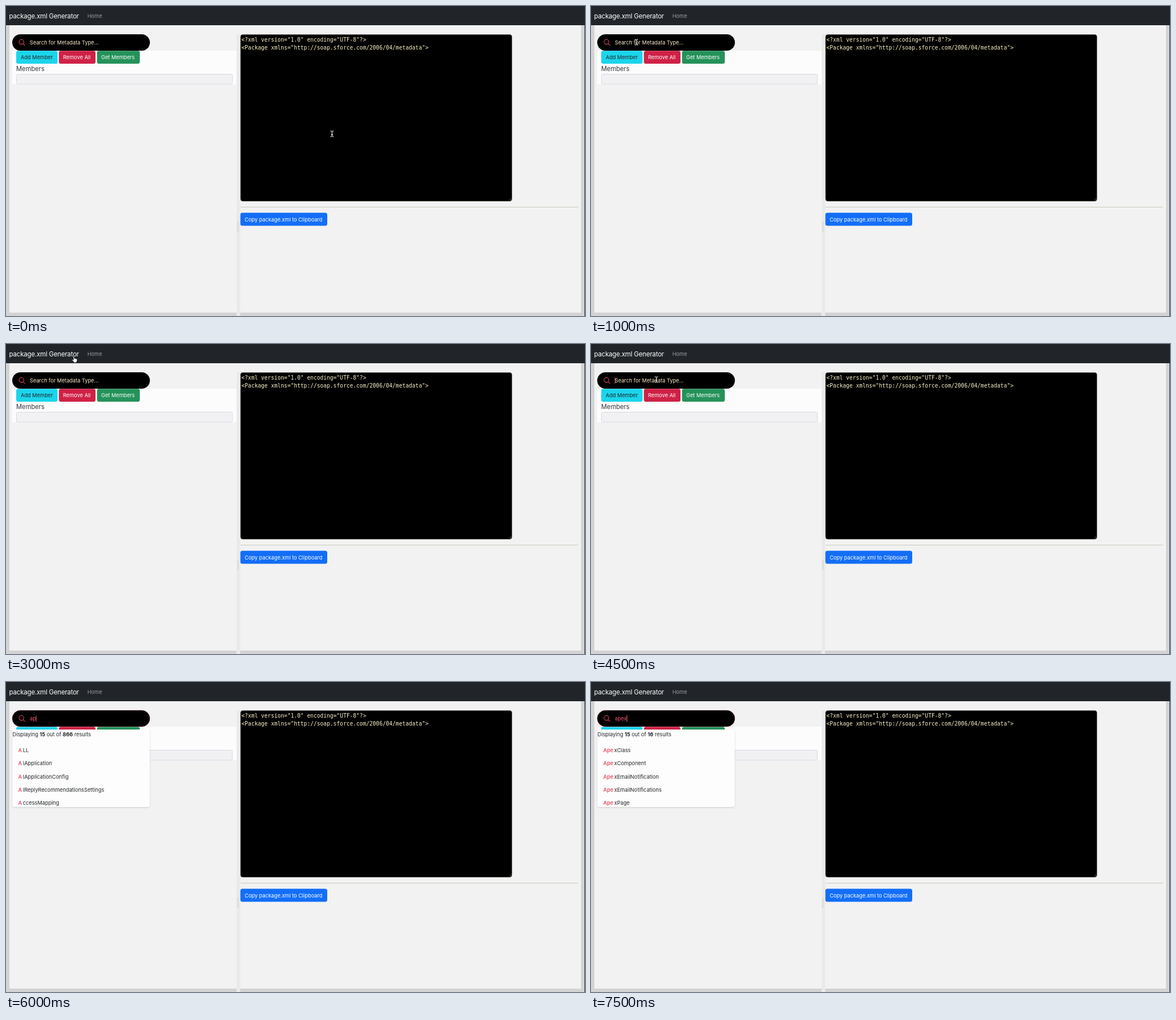
Recreate the animation shown at these times as an HTML page. Size 1022x548 px, loop 8000 ms.

```html
<!DOCTYPE html>
<html lang="en">
<head>
<meta charset="utf-8">
<title>package.xml Generator</title>
<style>
  html, body { margin: 0; width: 100%; height: 100%; overflow: hidden; background: #d3d3d4; }
  svg { display: block; width: 1022px; height: 548px; }
  text { font: 400 9.25px Inter, "Open Sans", sans-serif; white-space: pre; }
  .title { font-size: 11.5px; letter-spacing: -.17px; }
  .heading { font-size: 11.2px; }
  .code { font: 9.65px "DejaVu Sans Mono", "Liberation Mono", monospace; fill: #fbf3c8; }
  .b { font-weight: 700; }
  .hit { font-weight: 600; fill: #ec5069; }
  .white { fill: #fff; }
  .dark { fill: #212529; }
</style>
</head>
<body>
<svg viewBox="0 0 1022 548" xmlns="http://www.w3.org/2000/svg">
  <defs>
    <filter id="shadow" x="-5%" y="-5%" width="110%" height="112%">
      <feDropShadow dx="0" dy="1" stdDeviation="1.5" flood-color="#000" flood-opacity=".16"/>
    </filter>
    <pattern id="grip" x="408" y="382" width="2" height="2" patternUnits="userSpaceOnUse">
      <rect width="1" height="1" fill="#c4c4c8"/>
    </pattern>
  </defs>

  <rect width="1022" height="548" fill="#d3d3d4"/>
  <rect x="6" y="34" width="1009" height="508" fill="#f2f2f2"/>
  <rect x="1021" width="1" height="548" fill="#33363a"/>
  <rect width="1022" height="34" fill="#212529"/>
  <text class="title white" x="5.5" y="21.5">package.xml Generator</text>
  <text id="home" x="143.7" y="20.5">Home</text>

  <rect x="407" y="50" width="6.5" height="498" fill="#eaeaeb"/>
  <rect x="408" y="382" width="4" height="18" fill="url(#grip)"/>

  <rect x="11" y="79" width="396" height="59.5" fill="#fcfcfd"/>
  <g id="buttons"></g>
  <text class="heading" x="18" y="114.7" fill="#33373b">Members</text>
  <rect x="18.5" y="120.5" width="381" height="17.5" rx="2" fill="#f1f1f3" stroke="#d9d7e5"/>

  <rect x="414" y="50.5" width="479" height="294.5" rx="4" fill="#000" stroke="#5c5a48" stroke-width=".6"/>
  <path d="M888 343.5l4-4M890.5 343.5l1.5-1.5" stroke="#8a8a80" stroke-width=".6"/>
  <text class="code" x="415.5" y="62.6">&lt;?xml version="1.0" encoding="UTF-8"?&gt;</text>
  <text class="code" x="415.5" y="77.2">&lt;Package xmlns="http://soap.sforce.com/2006/04/metadata"&gt;</text>
  <path d="M414 355.5H1010" stroke="#c9c9be"/>

  <g id="drop" filter="url(#shadow)">
    <path d="M11.5 84H253.5V217a4 4 0 0 1-4 4H15.5a4 4 0 0 1-4-4Z" fill="#fdfdfd"/>
  </g>
  <g id="list"></g>

  <rect id="pill" x="11" y="50" width="243" height="29" rx="14.5" fill="#000"/>
  <g fill="none" stroke="#e5495d" stroke-width="1.1" stroke-linecap="round">
    <circle cx="27.2" cy="63.6" r="4.3"/>
    <path d="M30.4 66.8L33.2 69.6"/>
  </g>
  <text id="query" x="42" y="68"></text>
  <path id="caret" stroke="#f2788a" stroke-width=".9"/>

  <g id="beam" fill="none" stroke-linecap="round">
    <path id="beamLine" d="M-2.4 -5Q-.3 -5 0 -3.8Q.3 -5 2.4 -5M0 -3.8V3.8M-2.4 5Q-.3 5 0 3.8Q.3 5 2.4 5M-1.2 1.5H1.2" stroke="#222" stroke-width="2.2"/>
    <use href="#beamLine"/>
  </g>
  <path id="hand" fill="#fff" stroke="#111" stroke-width=".8" stroke-linejoin="round"
    d="M-2.4 -4.6Q-1.5 -6 -.6 -4.6L0 -1.3Q1 -2 1.7 -1Q2.7 -1.7 3.3 -.5Q4.6 -.8 4.7 .8Q4.8 3 3.6 4.6V6H-1.6V4.7L-4.6 1.2Q-4.6 -.3 -3 .5L-1.8 1.6Z"/>
  <path id="arrow" fill="#111" stroke="#fff" stroke-width=".8" d="M0 0V9.2L2.1 7.3L3.6 10.6L5.2 9.9L3.8 6.7H6.7Z"/>
</svg>
<script>
const NS = "http://www.w3.org/2000/svg";
const $ = id => document.getElementById(id);

function add(parent, tag, attrs, text) {
  const el = document.createElementNS(NS, tag);
  for (const k in attrs) el.setAttribute(k, attrs[k]);
  if (text) el.textContent = text;
  parent.append(el);
  return el;
}

function button(x, y, w, h, color, textX, label, cls) {
  const g = $("buttons");
  add(g, "rect", { x, y, width: w, height: h, rx: 3.5, fill: color });
  add(g, "text", { x: textX, y: y + h / 2 + 3.6, class: cls }, label);
}
button(18, 79.2, 73, 22.8, "#1bd5eb", 26, "Add Member", "dark");
button(93.3, 79.2, 64.7, 22.8, "#cf2146", 100.8, "Remove All", "white");
button(160.6, 79.2, 75.6, 22.8, "#25925a", 168, "Get Members", "white");
button(413.7, 365.5, 153.3, 23, "#136ef8", 421.2, "Copy package.xml to Clipboard", "white");

// Inner light stroke of the text cursor
const inner = document.querySelector("#beam use");
inner.replaceWith(Object.assign($("beamLine").cloneNode(), { id: "beamCore" }));
$("beamCore").setAttribute("stroke", "#f4f4f4");
$("beamCore").setAttribute("stroke-width", "1");

const STEP = 500, LOOP = 8000;
const POINTER = [
  ["beam", 575.5, 226], ["hand", 221.5, 88.5], ["beam", 80, 64], ["beam", 147, 50.3],
  ["arrow", 156, 32], ["hand", 44, 93], ["hand", 121, 27], ["hand", 158, 20],
  ["beam", 103, 62], ["beam", 115.5, 63], ["beam", 118, 76]
];
const TYPE_AT = 11, WORD = "apex";
const MATCHES = {
  A: ["LL", "IApplication", "IApplicationConfig", "IReplyRecommendationsSettings", "ccessMapping"],
  Apex: ["Class", "Component", "EmailNotification", "EmailNotifications", "Page"]
};

function showList(hit) {
  const g = $("list");
  g.replaceChildren();
  if (!hit) return;
  const head = add(g, "text", { x: 11.5, y: 95.7, class: "dark" });
  const total = hit === "Ape" ? "16" : "866";
  [["Displaying "], ["15", "b"], [" out of "], [total, "b"], [" results"]]
    .forEach(([s, cls]) => add(head, "tspan", { class: cls || "" }, s));
  const names = hit === "A" ? MATCHES.A : MATCHES.Apex.map(n => "Apex".slice(hit.length) + n);
  names.forEach((name, i) => {
    const row = add(g, "text", { x: 21.5, y: 123.8 + i * 23.35, class: "dark" });
    add(row, "tspan", { class: "hit" }, hit);
    add(row, "tspan", { dx: 1.5 }, name);
  });
}

function show(step) {
  const pos = POINTER[step];
  for (const id of ["beam", "hand", "arrow"]) {
    const on = pos && pos[0] === id;
    $(id).style.display = on ? "" : "none";
    if (on) $(id).setAttribute("transform", `translate(${pos[1]} ${pos[2]})`);
  }
  $("home").setAttribute("fill", step === 7 ? "#c9cacb" : "#9b9d9f");

  const typed = WORD.slice(0, Math.max(0, step - TYPE_AT + 1));
  const query = $("query");
  query.textContent = typed || "Search for Metadata Type...";
  query.setAttribute("fill", typed ? "#f0576e" : "#fbeacb");

  const caretX = 42.4 + (typed ? query.getComputedTextLength() : 0);
  $("caret").setAttribute("d", `M${caretX} 59V70`);
  $("caret").style.display = step >= 9 && step !== 14 ? "" : "none";
  $("pill").setAttribute("stroke", step >= 10 ? "rgba(232,85,108,.4)" : "none");
  $("pill").setAttribute("stroke-width", ".7");

  // The list trails the typed word by one key
  const hit = typed ? "Ape".slice(0, typed.length - 1) : "";
  $("drop").style.display = hit ? "" : "none";
  showList(hit);
}

let last = -1;
function tick() {
  const step = Math.floor(performance.now() % LOOP / STEP);
  if (step !== last) show(last = step);
  requestAnimationFrame(tick);
}
tick();
</script>
</body>
</html>
```
